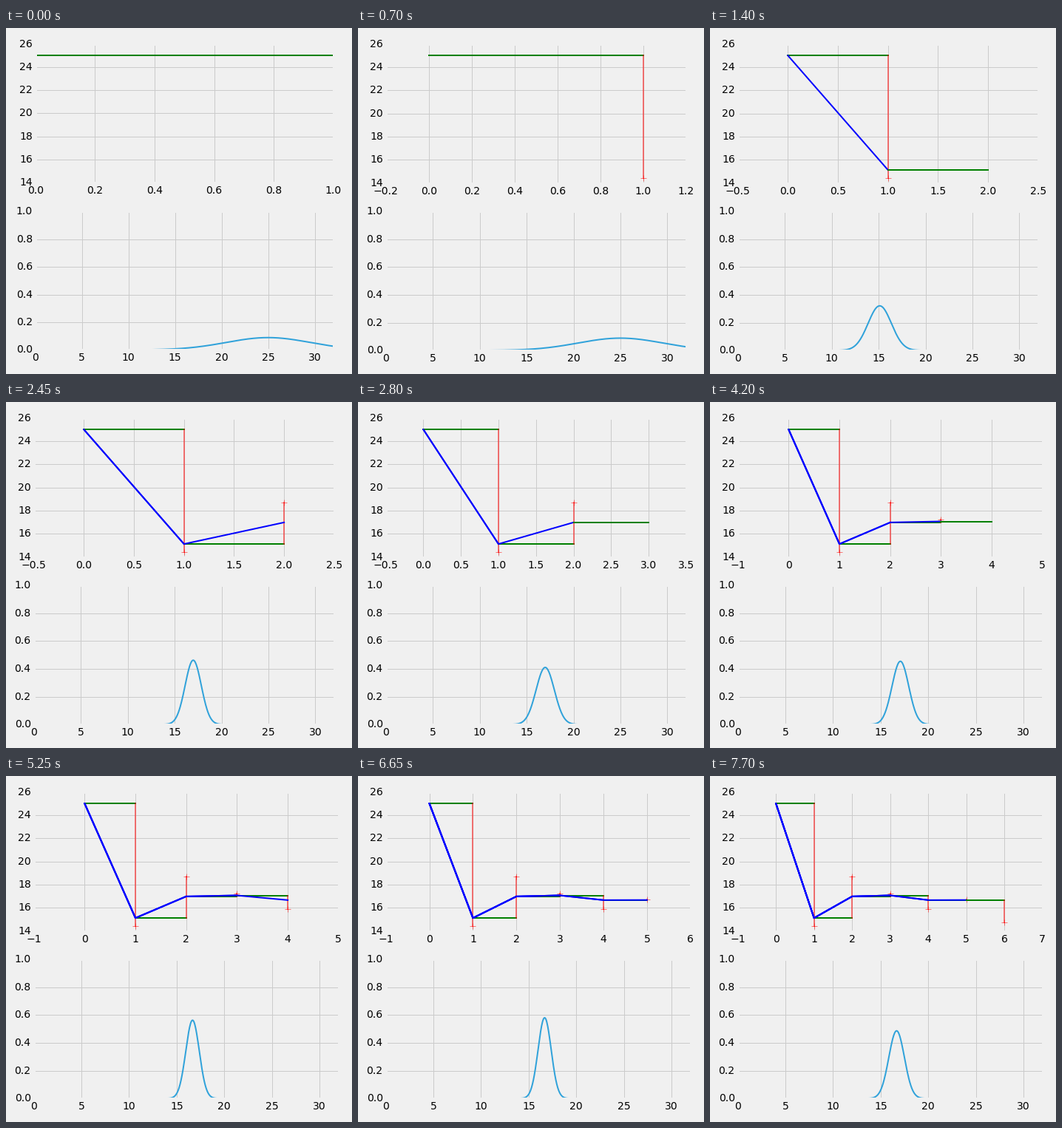
Write a matplotlib script that moves like this. It is 468x468 px and loops after 8000 ms.

```python
import numpy as np
import matplotlib.pyplot as plt
from matplotlib.animation import FuncAnimation

SIZE = 468
BG, GRID = "#f0f0f0", "#cbcbcb"
TICK_MS, HOLD = 50, 7          # every state lasts 7 ticks of 50 ms
FRAMES = 160

plt.rcParams.update({
    "font.family": "DejaVu Sans", "font.size": 14,
    "figure.facecolor": BG, "axes.facecolor": BG, "axes.edgecolor": BG,
    "axes.linewidth": 3, "axes.axisbelow": True, "axes.grid": True,
    "grid.color": GRID, "grid.linewidth": 1, "lines.linewidth": 2,
    "xtick.major.size": 0, "ytick.major.size": 0,
    "xtick.major.pad": 4, "ytick.major.pad": 4,
    "ytick.alignment": "center",
})

# One-dimensional Kalman filter
MEASURED = [14.415, 18.72, 17.2, 15.91, 16.69, 14.77]
MOVE_VAR, SENSOR_VAR = 0.2, 1.44


def run_filter(mean, var):
    priors, posts = [], []
    for z in MEASURED:
        var += MOVE_VAR
        priors.append((mean, var))
        gain = var / (var + SENSOR_VAR)
        mean, var = mean + gain * (z - mean), (1 - gain) * var
        posts.append((mean, var))
    return priors, posts


priors, posts = run_filter(25.0, 20.0)
track = [25.0] + [m for m, _ in posts]

fig = plt.figure(figsize=(SIZE / 72, SIZE / 72), dpi=72)
top = fig.add_axes([0.1, 0.55, 0.85, 0.4])
low = fig.add_axes([0.1, 0.07, 0.85, 0.4])
top.set_ylim(14, 26)
top.set_yticks(range(14, 27, 2))
low.set_xlim(0, 32)
low.set_ylim(0, 1)
low.set_xticks(range(0, 31, 5))
low.set_yticks(np.arange(6) / 5)

# Each artist appears at its own state and then stays
parts = []
for i, z in enumerate(MEASURED):
    prior = priors[i][0]
    green, = top.plot([i, i + 1], [prior, prior], color="green")
    mark = top.scatter([i + 1], [z], marker="+", s=64, c="red",
                       linewidths=0.5, zorder=1)
    gap, = top.plot([i + 1, i + 1], [prior, z], color="red", alpha=0.5)
    blue, = top.plot(range(i + 2), track[:i + 2], color="blue")
    parts += [green, mark, gap, blue]

xs = np.linspace(0, 32, 641)
bell, = low.plot([], [], color="#30a2da")


def place(ax, left, right, upper, lower):
    ax.set_position([left / SIZE, 1 - lower / SIZE,
                     (right - left) / SIZE, (lower - upper) / SIZE])


def lay_out(state, count):
    if state == 0:
        left, right, rows = 39.8, 442.8, (21.9, 208.9, 248.35, 435.35)
    else:
        left, right = 37.7, 443.8 if count < 4 else 449.8
        rows = (21.6, 209.6, 248.15, 436.15)
    place(top, left, right, *rows[:2])
    place(low, left, right, *rows[2:])


def scale_x(state, count):
    step = 0.2 if count == 1 else 0.5 if count < 4 else 1
    margin = 1 if state else 0
    ticks = np.arange(-margin, round(count / step) + margin + 1) * step
    top.set_xticks(ticks)
    top.set_xlim(ticks[0], ticks[-1])


def update(frame):
    state = frame // HOLD
    step, phase = divmod(state, 4)
    lay_out(state, step + 1)
    scale_x(state, step + 1)
    for i, part in enumerate(parts):
        part.set_visible(i <= state)
    mean, var = (posts if phase == 3 else priors)[step]
    bell.set_data(xs, np.exp(-(xs - mean) ** 2 / (2 * var))
                  / np.sqrt(2 * np.pi * var))
    return parts + [bell]


anim = FuncAnimation(fig, update, frames=FRAMES, interval=TICK_MS,
                     init_func=lambda: update(0), repeat=True,
                     repeat_delay=0, blit=False)
plt.show()
```
